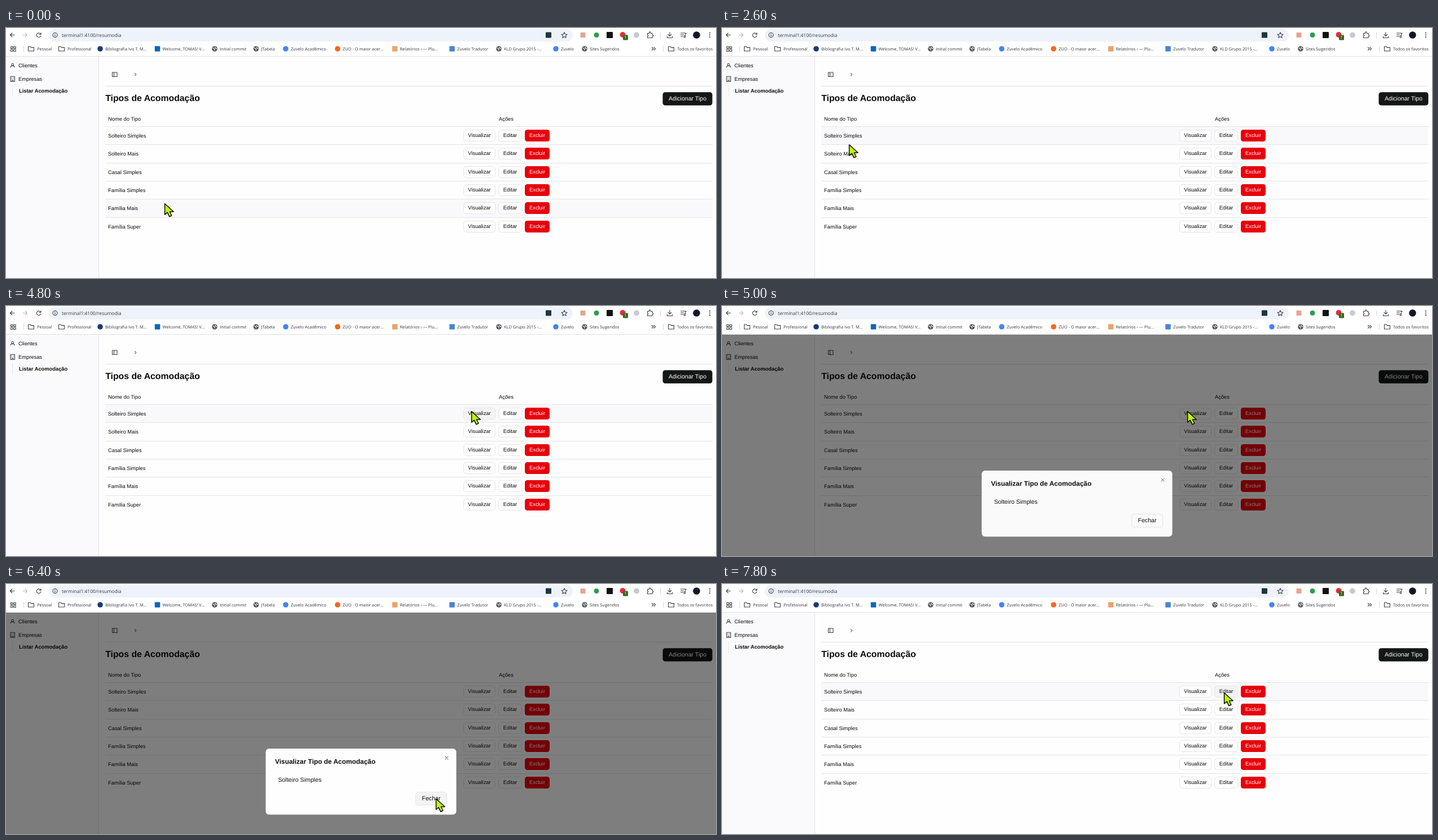
Animation, 1259 px wide and 445 px high, one loop 8 s. Source, as an HTML page:

```html
<!DOCTYPE html>
<html lang="pt">
<head>
<meta charset="utf-8">
<title>Tipos de Acomodação</title>
<style>
html, body { margin: 0; width: 100%; height: 100%; overflow: hidden; background: #fefefe; }
svg { display: block; width: 1259px; height: 445px; text-rendering: geometricPrecision; }
text { font-family: "Liberation Sans", Arial, sans-serif; fill: #0c0c0c; }
.chrome text { font-family: "Open Sans", "Noto Sans", sans-serif; fill: #33363b; }
.icon { fill: none; stroke: #3c4043; stroke-width: 1.1; stroke-linecap: round; stroke-linejoin: round; }
.rule { stroke: #e4e4e7; }
.outline { fill: #fefefe; stroke: #e6e6e8; }
.outline.hot { fill: #f4f4f5; }
.danger { fill: #e7000b; }
.dark { fill: #131716; }
.danger + text, .dark + text { fill: #fff; }
</style>
</head>
<body>
<svg id="stage" viewBox="0 0 1259 445">
  <rect width="1259" height="445" fill="#fefefe"/>
  <g id="page">
    <rect y="50" width="164" height="395" fill="#fafafc"/>
    <path class="rule" d="M164.5 50V445M11.5 102V122M176 103.5H1253"/>
    <rect id="rowHover" x="176" width="1077" height="32" fill="#f9f9fb"/>
  </g>
  <rect id="shade" y="50" width="1259" height="395" opacity=".5"/>
  <g id="modal">
    <rect id="panel" x="460.5" width="338" rx="6" fill="#fefefe"/>
    <g id="head"><path class="icon" d="M779 307l5 5m0-5l-5 5" style="stroke:#55575b;stroke-width:1"/></g>
    <g id="body"></g>
    <g id="foot"></g>
  </g>
  <g id="chrome" class="chrome">
    <rect width="1259" height="50" fill="#fff"/>
    <path d="M0 50.5H1259" stroke="#e0e2e6"/>
    <rect x="76" y="2" width="929" height="22" rx="11" fill="#eef2fb"/>
  </g>
  <path id="cursor" d="M.6 .8V20L5.2 16.2L8.9 23.8L12.9 22L9.4 15H16.2Z" fill="#bff500" stroke="#0a0a0a" stroke-width="1.5" stroke-linejoin="round"/>
</svg>
<script>
const NS = "http://www.w3.org/2000/svg";
const get = id => document.getElementById(id);
const page = get("page"), chrome = get("chrome");

function add(parent, tag, attrs, content) {
  const el = document.createElementNS(NS, tag);
  for (const k in attrs) el.setAttribute(k, attrs[k]);
  if (content) el.textContent = content;
  return parent.appendChild(el);
}
// y is the vertical middle of the capitals
const label = (parent, x, y, str, size = 9.33, extra = {}) =>
  add(parent, "text", { x, y: y + size * 0.345, "font-size": size, ...extra }, str);
const icon = (parent, d, extra = {}) => add(parent, "path", { class: "icon", d, ...extra });
const dot = (x, y, r, fill) => add(chrome, "circle", { cx: x, cy: y, r, fill });
const box = (x, y, s, fill) => add(chrome, "rect", { x: x - s / 2, y: y - s / 2, width: s, height: s, rx: 1, fill });

function button(parent, cls, x, y, w, h, str, size) {
  const edge = cls === "outline" ? 0.5 : 0;
  const el = add(parent, "rect", { class: cls, x: x + edge, y: y + edge, width: w - 2 * edge, height: h - 2 * edge, rx: 4.5 });
  label(parent, x + w / 2, y + h / 2 - 0.3, str, size, { "text-anchor": "middle" });
  return el;
}

function folder(x, y) {
  icon(chrome, `M${x - 5} ${y + 4}v-8h3.5l1.5 1.6h5v6.4z`);
}
function globe(x, y) {
  dot(x, y, 4.8, "#55585d");
  icon(chrome, `M${x - 3} ${y - 1.5}l2.5 1.2l.5 2.6M${x + 1} ${y - 3}l.5 2l2 .6`, { style: "stroke:#fff" });
}

// Navigation row
label(chrome, 99, 12.7, "terminal1:4100/resumodia", 8.5);
icon(chrome, "M15 12.5H7.5M11 9l-3.5 3.5L11 16");
icon(chrome, "M30 12.5H37.5M34 9l3.5 3.5L34 16", { style: "stroke:#b8babd" });
icon(chrome, "M61.5 11a3.8 3.8 0 1 0 .2 2.8M62 8.5v2.8h-2.8");
icon(chrome, "M91 12.5a4 4 0 1 0-8 0a4 4 0 1 0 8 0M87 12v2.4M87 10.3v.1");
icon(chrome, "M990 7.8l1.5 3.2l3.5.4l-2.6 2.4l.7 3.5l-3.1-1.8l-3.1 1.8l.7-3.5l-2.6-2.4l3.5-.4z");
box(962, 12.5, 10, "#1f3442");
box(1023, 12.5, 9, "#e5a58f");
dot(1047, 12.5, 4.5, "#2a9d4b");
box(1070.5, 12.5, 11, "#111");
dot(1093.5, 12, 5, "#e0333c");
box(1098.5, 17, 9, "#38661f");
label(chrome, 1098.5, 17, "1", 7, { "text-anchor": "middle", style: "fill:#fff" });
dot(1118, 12.5, 5, "#c9cacc");
icon(chrome, "M1137.5 9.5h3v-1.3a1.3 1.3 0 0 1 2.6 0v1.3h2.9v3h.6a1.2 1.2 0 0 1 0 2.4h-.6v2.6h-8.5v-2.6a1.3 1.3 0 0 0 0-2.6z");
icon(chrome, "M1160.5 8V18M1165.5 32V42", { style: "stroke:#d5d9e2" });
icon(chrome, "M1177 7.5v6.5M1174 11.3l3 3l3-3M1172.5 15v2.5h9V15");
icon(chrome, "M1196.5 9h8M1196.5 12h5M1196.5 15h4M1204.5 15.5V9.5h2M1204.5 15.5a1.2 1.2 0 1 1-2.2 0a1.2 1.2 0 1 1 2.2 0");
dot(1224.5, 12.5, 6.3, "#101828");
for (const y of [8.8, 12.5, 16.2]) dot(1248, y, 1.1, "#3c4043");

// Bookmarks row: text x, title, icon kind, colour
for (const x of [8.5, 13.8]) for (const y of [33, 38.3])
  icon(chrome, `M${x} ${y}h3.4v3.4h-3.4z`);
icon(chrome, "M31.5 32V42", { style: "stroke:#d5d9e2" });
icon(chrome, "M1145.5 34.5l2.5 2.5l-2.5 2.5M1149 34.5l2.5 2.5l-2.5 2.5");
const marks = [
  [55, "Pessoal", folder], [109, "Professional", folder],
  [176, "Bibliografia Ivo T. M...", dot, "#173a7c"],
  [277.5, "Welcome, TOMAS! V...", box, "#0a66c2"],
  [379, "Initial commit", globe], [452.5, "JTabela", globe],
  [505, "Zuvelo Acadêmico", dot, "#4285f4"],
  [597, "ZUO - O maior acer...", dot, "#f06a1c"],
  [698.5, "Relatórios ‹ — Plu...", box, "#eda36a"],
  [800, "Zuvelo Tradutor", box, "#4b83d8"],
  [883, "KLD Grupo 2015 -...", globe],
  [984, "Zuvelo", dot, "#4285f4"],
  [1035, "Sites Sugeridos", globe], [1190, "Todos os favoritos", folder]
];
for (const [x, title, kind, color] of marks) {
  label(chrome, x, 37, title, 7.45);
  const cx = x - (kind === folder ? 10.5 : 9);
  if (kind === dot) dot(cx, 37, 4.8, color);
  else if (kind === box) box(cx, 37, 9.5, color);
  else kind(cx, 37);
}

// Sidebar and page header
icon(page, "M13.5 65.2a1.9 1.9 0 1 0-3.8 0a1.9 1.9 0 1 0 3.8 0M8.3 70v-.6a2 2 0 0 1 2-2h2.6a2 2 0 0 1 2 2v.6");
icon(page, "M8 86.2h7.4v9H8zM10.4 95v-2h2.6v2M10 88.3h.2M13 88.3h.2M10 90.6h.2M13 90.6h.2");
label(page, 22, 67, "Clientes");
label(page, 22, 90.5, "Empresas");
label(page, 23, 111.8, "Listar Acomodação", 9.33, { "font-weight": "bold" });
icon(page, "M188.5 79h8.5v7.5h-8.5zM191.4 79v7.5");
icon(page, "M228.5 80.5l2.2 2.3l-2.2 2.3", { style: "stroke:#66686c" });
label(page, 176.2, 124.7, "Tipos de Acomodação", 15.8, { "font-weight": "bold" });
label(page, 181, 162, "Nome do Tipo");
label(page, 887, 162, "Ações", 9.33, { "text-anchor": "middle" });
button(page, "dark", 1164.5, 114.2, 88, 23.6, "Adicionar Tipo", 10.6);

// Table
const TOP = 175, STEP = 32.35;
const names = ["Solteiro Simples", "Solteiro Mais", "Casal Simples", "Família Simples", "Família Mais", "Família Super"];
const hoverables = [];
names.forEach((name, i) => {
  const y = Math.round(TOP + STEP * i);
  add(page, "path", { class: "rule", d: `M176 ${y + 0.5}H1253` });
  label(page, 181, y + 16.4, name);
  for (const [x, w, str] of [[811, 57, "Visualizar"], [873, 42, "Editar"]])
    hoverables.push({ el: button(page, "outline", x, y + 6, w, 21, str), x, y: y + 6, w, h: 21 });
  button(page, "danger", 920, y + 6, 44, 21, "Excluir");
});

// Dialog
label(get("head"), 477, 315.5, "Visualizar Tipo de Acomodação", 11.9, { "font-weight": "bold" });
label(get("body"), 482.5, 348.3, "Solteiro Simples", 10.67);
const closeButton = {
  el: button(get("foot"), "outline", 726, 370, 56, 24, "Fechar", 10.67),
  x: 726, y: 370, w: 56, h: 24
};

const LOOP = 8000, TICK = 200, OPEN = 5000, CLOSING = 6800, CLOSED = 7000;
// Pointer stops: time, x, y
const route = [
  [0, 281, 312], [600, 262, 360], [1000, 256, 381], [1400, 250, 340], [2000, 222, 150],
  [2600, 225, 207], [3200, 228, 320], [3600, 230, 364], [4000, 230, 364], [4800, 825, 187],
  [5200, 825, 187], [6200, 745, 378], [6400, 762, 381.5], [6600, 762, 381.5], [6800, 740, 339],
  [7800, 890, 193], [8000, 890, 193]
];

function cursorAt(t) {
  const i = Math.max(1, route.findIndex(p => p[0] >= t));
  const [t0, x0, y0] = route[i - 1], [t1, x1, y1] = route[i];
  const k = (t - t0) / (t1 - t0), e = k * k * (3 - 2 * k);
  return [x0 + (x1 - x0) * e, y0 + (y1 - y0) * e];
}
const shift = (id, dy) => get(id).setAttribute("transform", `translate(0 ${dy})`);
const show = (id, on) => get(id).setAttribute("visibility", on ? "visible" : "hidden");
const inside = (b, x, y) => x >= b.x && x <= b.x + b.w && y >= b.y && y <= b.y + b.h;

function render(t) {
  const [x, y] = cursorAt(t);
  const open = t >= OPEN && t < CLOSING, closing = t >= CLOSING && t < CLOSED;
  get("cursor").setAttribute("transform", `translate(${x} ${y})`);

  const row = Math.floor((y - TOP - 0.5) / STEP);
  const free = !open && !closing;
  show("rowHover", free && row >= 0 && row < names.length);
  get("rowHover").setAttribute("y", Math.round(TOP + STEP * row) + 0.5);
  for (const b of hoverables) b.el.classList.toggle("hot", free && inside(b, x, y));
  closeButton.el.classList.toggle("hot", open && inside(closeButton, x, y));
  show("shade", open);

  // The dialog loses its body line and shrinks while fading out
  const fold = closing ? 12 : 0, scale = closing ? 0.95 : 1;
  const modal = get("modal");
  modal.setAttribute("display", open || closing ? "inline" : "none");
  modal.setAttribute("opacity", closing ? 0.07 : t === OPEN ? 0.97 : 1);
  modal.setAttribute("transform", `translate(629.5 351.5) scale(${scale}) translate(-629.5 -351.5)`);
  get("panel").setAttribute("y", 293 + fold);
  get("panel").setAttribute("height", 117.5 - 2 * fold);
  shift("head", fold);
  shift("foot", -fold);
  get("body").setAttribute("display", closing ? "none" : "inline");
}

const start = performance.now();
function frame() {
  const t = (performance.now() - start) % LOOP;
  render(Math.floor(t / TICK) * TICK);
  requestAnimationFrame(frame);
}
frame();
</script>
</body>
</html>
```
